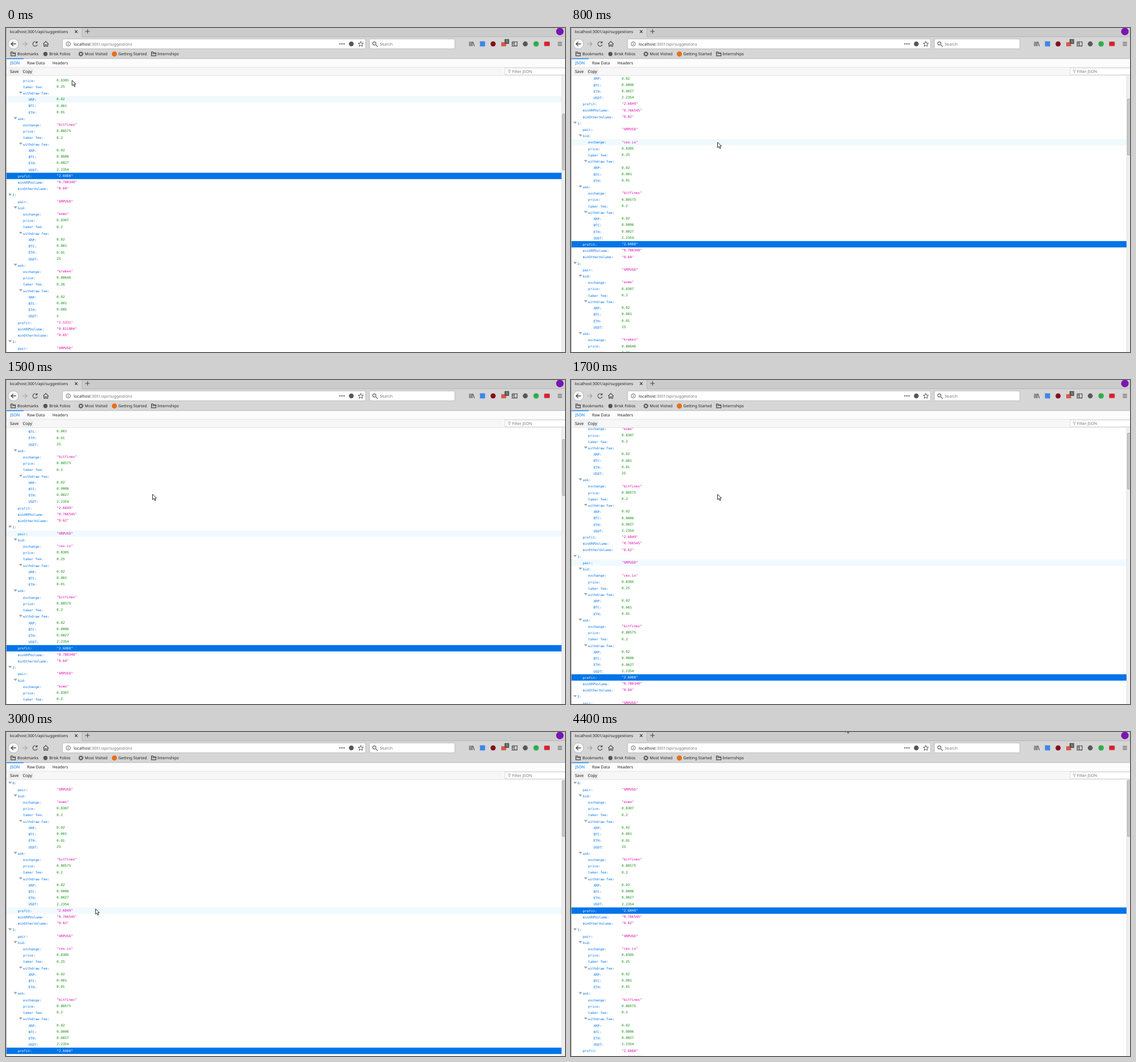
Animation, 982 px wide and 570 px high, one loop 4.5 s. Source, as an HTML page:

```html
<!DOCTYPE html>
<html lang="en">
<head>
<meta charset="utf-8">
<title>JSON viewer</title>
<style>
  html, body { margin: 0; width: 100%; height: 100%; overflow: hidden; background: #fff; }
  svg { display: block; width: 982px; height: 570px; }
  text { font: 7px "Noto Sans", "Open Sans", sans-serif; fill: #222; text-rendering: geometricPrecision; white-space: pre; }
  #rows text { font: 5.92px "DejaVu Sans Mono", "Noto Sans Mono", monospace; }
  #rows .key { fill: #0074e8; }
  #rows .str { fill: #dd00a9; }
  #rows .num { fill: #058b00; }
  #rows .on text { fill: #fff; }
  .ico { fill: none; stroke: #444; stroke-width: 1.1; }
</style>
</head>
<body>
<svg viewBox="0 0 982 570" xmlns="http://www.w3.org/2000/svg">
  <defs>
    <clipPath id="view"><rect x="0" y="83.8" width="976" height="487"/></clipPath>
    <g id="folder" class="ico"><path d="M.5 7.5V1h3l1 1.3h4V7.5zM.5 3.6h8"/></g>
  </defs>
  <rect width="982" height="570" fill="#fff"/>

  <!-- page rows -->
  <g clip-path="url(#view)">
    <g id="page">
      <rect id="hover" x="1" width="975" height="11.2" fill="#f0f9fe"/>
      <rect id="pick" x="1" width="975" height="11.2" fill="#0074e8"/>
      <g id="rows"></g>
    </g>
  </g>
  <rect x="976" y="84" width="6" height="486" fill="#efefef"/>
  <path d="M976.2 84V570" stroke="#d4d4d4" stroke-width=".6"/>
  <rect id="thumb" x="977.4" y="85.3" width="6" height="98.5" rx="1" fill="#c9c9c9" stroke="#a2a2a2" stroke-width=".8"/>

  <!-- tab strip and toolbars -->
  <rect width="982" height="54" fill="#d6d6d6"/>
  <rect x="133.5" width="849" height="15.5" fill="#cbcbcb"/>
  <path d="M133.5 0V15.5H982" fill="none" stroke="#b4b4b4" stroke-width=".8"/>
  <text x="6.5" y="8.8">localhost:3001/api/suggestions</text>
  <path class="ico" d="M121 3.9l4.6 4.6m0-4.6l-4.6 4.6M139.4 6h7.6m-3.8-3.8v7.6"/>
  <circle cx="973" cy="6.2" r="6.6" fill="#7a16b0"/>

  <circle cx="13" cy="28" r="9" fill="#f8f8f8" stroke="#a8a8a8" stroke-width=".8"/>
  <path class="ico" style="stroke-width:1.3" d="M17.5 28H9m3.8-3.9L8.9 28l3.9 3.9"/>
  <path class="ico" style="stroke:#a0a0a0" d="M28.5 28H37m-3.8-3.9l3.9 3.9l-3.9 3.9"/>
  <path class="ico" d="M54.2 25.4A4 4 0 1 0 55 29.2M54.8 23.4v2.8h-2.9"/>
  <path class="ico" d="M65.2 28.3L70 23.6l4.8 4.7M66.7 27.5v4.8h2.2v-2.8h2.2v2.8h2.2v-4.8"/>

  <rect x="99.4" y="19.2" width="532.4" height="17.4" rx="1.8" fill="#fff" stroke="#b2b2b2" stroke-width=".8"/>
  <circle cx="109.4" cy="28" r="3.7" class="ico" style="stroke-width:.8"/>
  <path class="ico" d="M109.4 27.4v2.6m0-4.4v.9" style="stroke-width:.9"/>
  <text x="119" y="30.6">localhost<tspan fill="#777">:3001/api/suggestions</tspan></text>
  <g fill="#555"><circle cx="586.6" cy="28" r="1.15"/><circle cx="590.2" cy="28" r="1.15"/><circle cx="593.8" cy="28" r="1.15"/><circle cx="606.6" cy="28" r="4.2"/></g>
  <path id="star" class="ico" style="stroke-width:.9"/>
  <rect x="638.4" y="19.2" width="150.2" height="17.4" rx="1.8" fill="#fff" stroke="#b2b2b2" stroke-width=".8"/>
  <path class="ico" d="M650 29.8l3 3m-8.8-5.7a2.9 2.9 0 1 0 5.8 0a2.9 2.9 0 1 0-5.8 0"/>
  <text x="656.4" y="30.6" style="font-size:7.2px;fill:#777">Search</text>

  <path class="ico" d="M814.3 24v8m2.4-8v8m2.2-8v8m1.2-7.8l2.6 7.8"/>
  <rect x="832.6" y="23.4" width="9" height="9" fill="#3d86e8"/>
  <circle cx="855.7" cy="28" r="4.5" fill="#84101c"/>
  <rect x="870" y="25" width="8.6" height="7.2" fill="#d9574c"/>
  <rect x="875.8" y="19.4" width="8" height="8.6" rx=".8" fill="#5a5a5a"/>
  <text x="878.2" y="26" style="font-size:6px;fill:#fff">1</text>
  <path class="ico" d="M889.2 24.2h8.6v7.4h-8.6zM893 24.2v7.4M890.4 26.4h1.5m-1.5 2h1.5"/>
  <circle cx="912.2" cy="28" r="4.4" fill="#585858"/>
  <circle cx="931.2" cy="28" r="4.8" fill="#2fae4e"/>
  <rect x="945.4" y="24" width="9.8" height="7.8" rx="1.5" fill="#d42330"/>
  <path class="ico" d="M969.3 25.2h7.4m-7.4 2.8h7.4m-7.4 2.8h7.4"/>

  <use href="#folder" x="8" y="41.4"/>
  <text x="20" y="48.2">Bookmarks</text>
  <circle cx="69.2" cy="45.7" r="3.7" fill="#555"/>
  <text x="76" y="48.2">Brisk Folios</text>
  <circle cx="131.6" cy="45.7" r="2.6" class="ico" style="stroke-width:1.3"/>
  <circle cx="131.6" cy="45.7" r="3.8" class="ico" style="stroke-width:1.2" stroke-dasharray="1.4 1.58"/>
  <text x="138.2" y="48.2">Most Visited</text>
  <circle cx="190.4" cy="45.7" r="4.5" fill="#e5701c"/>
  <text x="197.2" y="48.2">Getting Started</text>
  <use href="#folder" x="255" y="41.4"/>
  <text x="266" y="48.2">Internships</text>

  <!-- viewer bars -->
  <rect y="54" width="982" height="15.2" fill="#fcfcfc"/>
  <path d="M0 53.8H982" stroke="#b3b3b3" stroke-width=".8"/>
  <rect y="53.4" width="31" height="1.3" fill="#0a84ff"/>
  <text x="7.6" y="63.7" style="fill:#0074e8">JSON</text>
  <text x="37" y="63.7">Raw Data</text>
  <text x="81.5" y="63.7">Headers</text>
  <rect y="69.2" width="982" height="14.6" fill="#f7f7f8"/>
  <path d="M0 69.2H982M0 83.5H982" stroke="#dedee0" stroke-width=".8"/>
  <rect x="5" y="71" width="19.5" height="11" fill="#ededee"/>
  <rect x="27.5" y="71" width="20.5" height="11" fill="#ededee"/>
  <text x="7" y="78.9">Save</text>
  <text x="29.5" y="78.9">Copy</text>
  <rect x="876.4" y="70.4" width="107" height="11.8" fill="#fff" stroke="#d0d0d2" stroke-width=".8"/>
  <path d="M881.6 73.8h5l-2 2.6v2.8l-1-.8v-2z" fill="none" stroke="#999" stroke-width=".7"/>
  <text x="889" y="78.9" style="fill:#777">Filter JSON</text>
  <rect width="1" height="570" fill="#a9a9a9"/>

  <path id="cursor" d="M0 0V9.4L2.2 7.5L3.9 11.2L5.5 10.5L3.9 6.9H6.8Z" fill="#fff" stroke="#111" stroke-width=".9" stroke-linejoin="round"/>
</svg>
<script>
const LOOP = 4500, STEP = 100, TOP = 84.3, PITCH = 11.215;
const $ = id => document.getElementById(id);

const rows = [];
const add = (depth, key, value) => rows.push({ depth, key, value });

// fees: values for XRP, BTC, ETH and, where charged, USDT
function addSide(name, exchange, price, taker, fees) {
  add(1, name);
  add(2, "exchange", `"${exchange}"`);
  add(2, "price", price);
  add(2, "taker fee", taker);
  add(2, "withdraw fee");
  fees.split(" ").forEach((fee, i) => add(3, ["XRP", "BTC", "ETH", "USDT"][i], fee));
}
function addItem(index, bid, ask, profit, xrp, other) {
  add(0, index);
  add(1, "pair", '"XRPUSD"');
  addSide("bid", ...bid);
  addSide("ask", ...ask);
  add(1, "profit", `"${profit}"`);
  add(1, "minXRPVolume", `"${xrp}"`);
  add(1, "minOtherVolume", `"${other}"`);
}
const exmo = ["exmo", "0.8307", "0.2", "0.02 0.001 0.01 25"];
const cex = ["cex.io", "0.8305", "0.25", "0.02 0.001 0.01"];
const bitfinex = ["bitfinex", "0.80575", "0.2", "0.02 0.0006 0.0027 2.2354"];
const kraken = ["kraken", "0.80646", "0.26", "0.02 0.001 0.005 5"];
addItem(0, exmo, bitfinex, "2.6849", "0.766545", "0.62");
addItem(1, cex, bitfinex, "2.6088", "0.788340", "0.64");
addItem(2, exmo, kraken, "2.5331", "0.811864", "0.65");
add(0, 3);
add(1, "pair", '"XRPUSD"');

const rowY = i => TOP + i * PITCH;
$("rows").innerHTML = rows.map(({ depth, key, value }, i) => {
  const x = 11.3 + 9.4 * depth, y = rowY(i);
  const label = `<text class="key" x="${x}" y="${y + 8.1}">${key}:</text>`;
  const rest = value
    ? `<text class="${value[0] === '"' ? "str" : "num"}" x="89.1" y="${y + 7.3}">${value}</text>`
    : `<path d="M${x - 7.4} ${y + 3.1}h6.4l-3.2 3.9z" fill="#a3a3a3"/>`;
  return `<g>${label}${rest}</g>`;
}).join("");
const rowNodes = [...$("rows").children];

$("star").setAttribute("d", "M" + Array.from({ length: 10 }, (_, i) => {
  const r = i % 2 ? 2.1 : 4.9, a = i * Math.PI / 5;
  return `${623.3 + r * Math.sin(a)} ${28.3 - r * Math.cos(a)}`;
}).join("L") + "Z");

// [ms, x, y]
const path = [
  [0, 116, 92], [300, 195, 173], [400, 195, 173], [800, 257.5, 201], [2000, 257.5, 201],
  [2100, 255.3, 202], [2500, 165, 299], [2600, 165, 299], [2700, 158, 311], [2900, 158, 311],
  [3000, 157.3, 311], [3100, 157.3, 311], [3200, 159, 306], [3300, 180, 280],
  [3400, 228, 237], [3500, 290, 199], [4000, 482, -9.5], [4300, 482, -9.5], [4400, 482.5, -9]
];
// [ms, offset]
const scroll = [
  [0, 300.7], [400, 300.7], [500, 288], [700, 200], [800, 180.5], [1000, 180.5], [1100, 177],
  [1200, 160], [1300, 152.5], [1400, 128], [1500, 89], [1800, 12], [1900, 0]
];
// [ms, row]
const hovers = [
  [0, 30], [200, 32], [300, 34], [800, 26], [1300, 24], [1900, 10], [2200, 12], [2300, 14],
  [2400, 17], [2500, 19], [2700, 20], [3300, 17], [3400, 13], [3600, 6], [3700, 2], [3800, -9]
];
const picks = [[0, 42], [3100, 20]];

const held = (table, t) => table.findLast(k => k[0] <= t)[1];
function tween(table, t, col = 1) {
  const i = table.findLastIndex(k => k[0] <= t), a = table[i], b = table[i + 1];
  return b ? a[col] + (b[col] - a[col]) * (t - a[0]) / (b[0] - a[0]) : a[col];
}

function draw(ms) {
  const t = Math.floor(ms % LOOP / STEP) * STEP;
  const offset = tween(scroll, t), pick = held(picks, t);
  $("page").setAttribute("transform", `translate(0 ${-offset})`);
  $("thumb").setAttribute("y", 85.3 + offset * 0.2195);
  $("hover").setAttribute("y", rowY(held(hovers, t)));
  $("pick").setAttribute("y", rowY(pick));
  rowNodes.forEach((node, i) => node.classList.toggle("on", i === pick));
  $("cursor").setAttribute("transform", `translate(${tween(path, t)} ${tween(path, t, 2)})`);
}

const start = performance.now();
function tick() {
  draw(performance.now() - start);
  requestAnimationFrame(tick);
}
tick();
</script>
</body>
</html>
```
